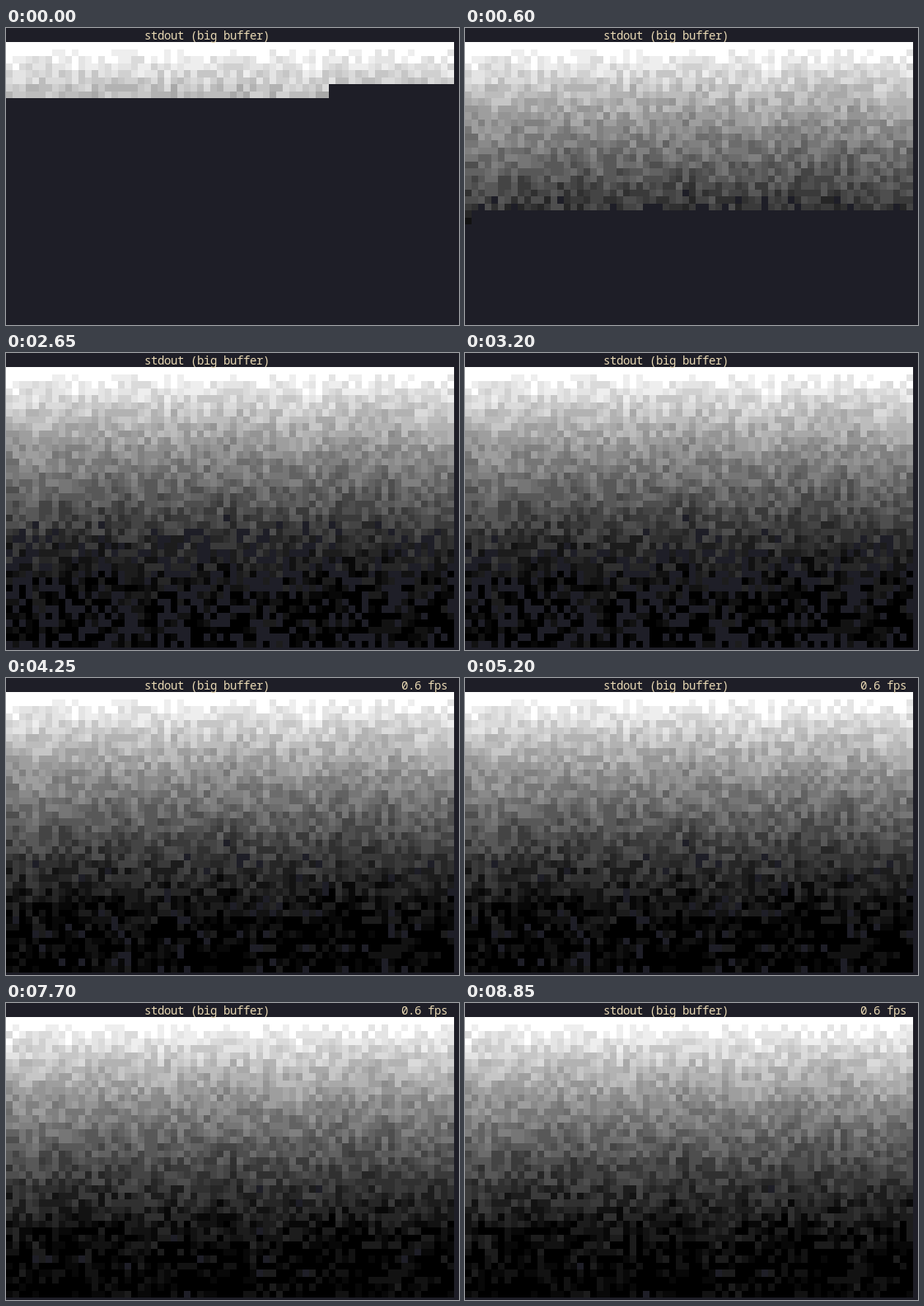
An HTML page with a canvas that plays this animation: 550x360 px, repeating every 8950 ms.

```html
<!DOCTYPE html>
<html lang="en">
<head>
<meta charset="utf-8">
<title>stdout (big buffer)</title>
<style>
  html, body { margin: 0; width: 100%; height: 100%; overflow: hidden; background: #1e1e27; }
  canvas, svg { position: absolute; left: 0; top: 0; }
  text { font: 14px "Noto Sans Mono", "DejaVu Sans Mono", monospace; letter-spacing: -0.4px; fill: #e9d9b4; }
</style>
</head>
<body>
<canvas id="screen" width="550" height="360"></canvas>
<svg width="550" height="360" viewBox="0 0 550 360">
  <text x="168" y="13.5">stdout (big buffer)</text>
  <text id="fps" x="480" y="13.5">0.6 fps</text>
</svg>
<script>
const LOOP = 8950, COLS = 68, LINES = 20, CELL_W = 8, LINE_H = 17, TOP = 17;
const SWEEP_MS = 2550, SWEEP_LEAD = 850, FLUSHES_PER_SWEEP = 5;
const FIRST_LINES = 3.72, LINES_PER_FLUSH = 4.145;
const BG = '#1e1e27';

const ctx = document.getElementById('screen').getContext('2d');
const fps = document.getElementById('fps');
const clamp01 = v => Math.min(1, Math.max(0, v));

function hash(x, y, seed) {
  let h = Math.imul(x + 11, 374761393) ^ Math.imul(y + 7, 668265263) ^ Math.imul(seed + 3, 1442695041);
  h = Math.imul(h ^ (h >>> 15), 2246822519);
  h = Math.imul(h ^ (h >>> 13), 3266489917);
  return ((h ^ (h >>> 16)) >>> 0) / 4294967296;
}

// Snap to the terminal's 24-step grey ramp
function grey(v) {
  if (v < 5) return '#000';
  if (v > 243) return '#fff';
  const g = 8 + 10 * Math.max(0, Math.round((v - 8) / 10));
  return `rgb(${g},${g},${g})`;
}

function cellColor(col, row, sweep) {
  const x = col + Math.floor(sweep / 3);
  const emptyRate = 0.32 * Math.pow(0.22, sweep) * clamp01((row - 20) / 9);
  if (hash(x, row, 50) < emptyRate) return BG;
  const seed = hash(x, row, 90) < 0.06 * sweep ? sweep : 0;
  const base = 256 * Math.pow(clamp01(1 - row / 36), 1.5);
  const patch = 3 * Math.sin(x * 0.31 + row * 0.05) + 2 * Math.sin(x * 0.73 - row * 0.04);
  const spread = 24 + 22 * clamp01(row / 5);
  return grey(base + (hash(x, row, seed) - 0.5) * spread + patch * clamp01(row / 10));
}

// Each flush empties one full buffer, a little over four lines
function flushCount(t) {
  const clock = t + SWEEP_LEAD;
  const sweep = Math.floor(clock / SWEEP_MS);
  const phase = clock % SWEEP_MS;
  const inSweep = Math.min(FLUSHES_PER_SWEEP - 1, Math.floor((phase + 50) / 500));
  return Math.max(0, sweep * FLUSHES_PER_SWEEP + inSweep - 1);
}

function drawCells(flushes) {
  ctx.fillStyle = BG;
  ctx.fillRect(0, 0, 550, 360);
  const sent = Math.round((FIRST_LINES + LINES_PER_FLUSH * flushes) * COLS);
  for (let line = 0; line < LINES; line++) {
    for (let col = 0; col < COLS; col++) {
      const sweep = Math.floor((sent - line * COLS - col - 1) / (COLS * LINES));
      if (sweep < 0) continue;
      const x = col * CELL_W, y = TOP + line * LINE_H;
      ctx.fillStyle = cellColor(col, line * 2, sweep);
      ctx.fillRect(x, y, CELL_W, 9);
      ctx.fillStyle = cellColor(col, line * 2 + 1, sweep);
      ctx.fillRect(x, y + 9, CELL_W, 8);
    }
  }
}

let shown = -1;
function render(t) {
  const flushes = flushCount(t);
  if (flushes === shown) return;
  shown = flushes;
  drawCells(flushes);
  // The rate is known once two sweeps are complete
  fps.setAttribute('visibility', t >= 2 * SWEEP_MS - SWEEP_LEAD ? 'visible' : 'hidden');
}

const start = performance.now();
function tick() {
  render((performance.now() - start) % LOOP);
  requestAnimationFrame(tick);
}
tick();
</script>
</body>
</html>
```
